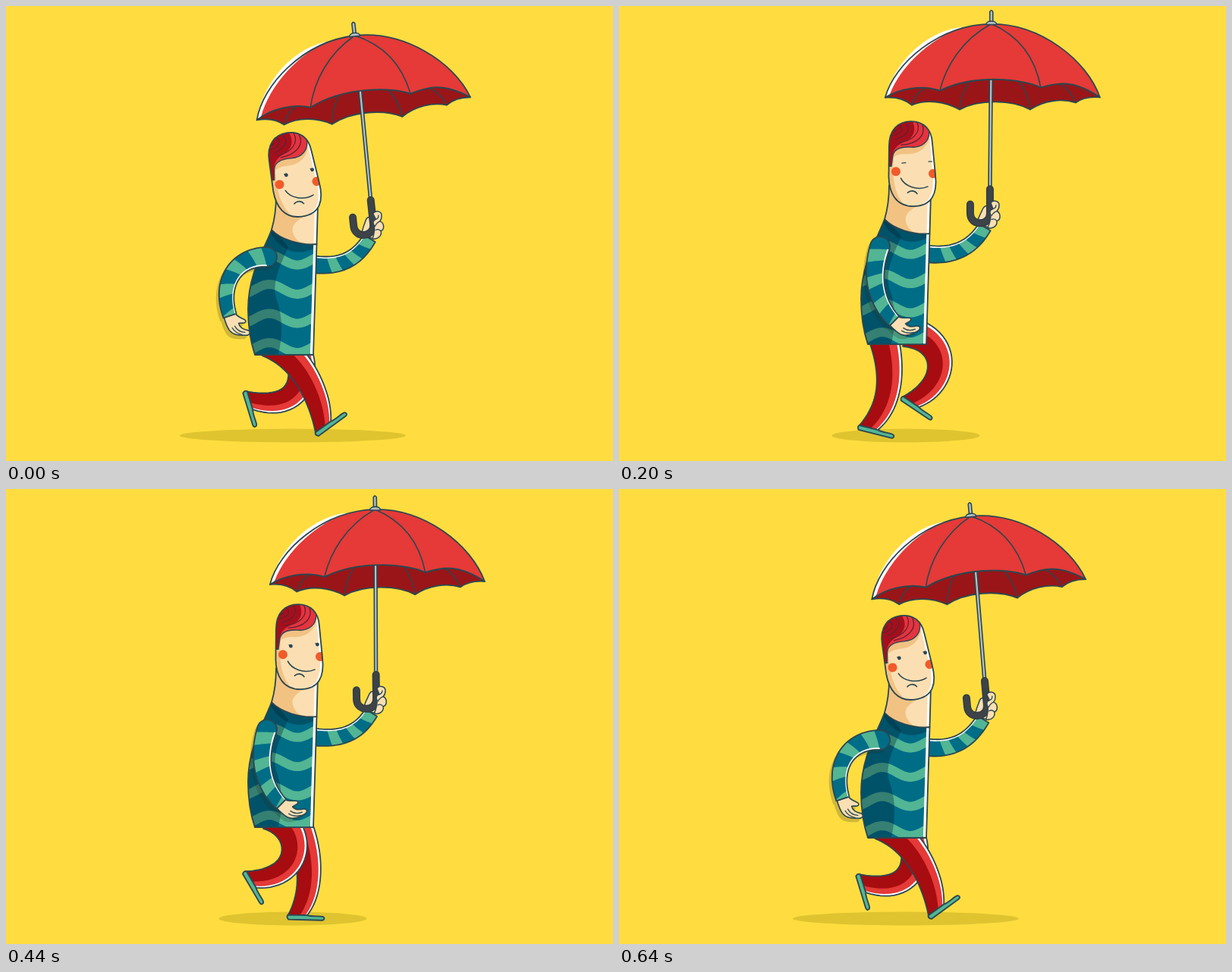
An HTML page with a canvas that plays this animation: 800x600 px, repeating every 0.68 s.

```html
<!DOCTYPE html>
<html lang="en">
<head>
<meta charset="utf-8">
<title>Umbrella walk</title>
<style>
html, body { margin: 0; width: 100%; height: 100%; overflow: hidden; background: #ffdd40; }
canvas { display: block; width: 800px; height: 600px; }
</style>
</head>
<body>
<canvas id="stage"></canvas>
<script>
const canvas = document.getElementById('stage');
const ctx = canvas.getContext('2d');
const dpr = window.devicePixelRatio || 1;
canvas.width = 800 * dpr;
canvas.height = 600 * dpr;

const STEP = 40, STEPS = 17, CYCLE = 16;
const INK = '#2b4650', TEAL = '#006d87', GREEN = '#52b594', RED = '#e53a37',
  DARK_RED = '#a60c10', SKIN = '#fbdfb3', TAN = '#f2c283', SHADE = 'rgba(0,35,55,.36)',
  GREY = '#b4c0c6';

// Step path: time, ankle x, y, foot angle
const stride = [
  [0, 418, 555, -36], [2, 368, 562, -5], [5, 329, 556, 14], [7, 291, 531, 60],
  [9, 299, 514, 76], [13, 354, 522, 34], [15, 401, 541, -5]
];
// Umbrella bob: time, grip x, y, tilt
const bob = [
  [.5, 480.5, 254, -6.1], [1, 482, 254, -4], [2, 485.5, 247, -2.1],
  [4.5, 489.2, 239.4, .2], [7, 485, 245, -2.9]
];

const rad = d => d * Math.PI / 180;
const wave = (p, peak = 0) => Math.cos((p - peak) / CYCLE * 2 * Math.PI);

// Smooth cyclic interpolation through the keys
function pose(keys, time, cycle) {
  const n = keys.length;
  const key = i => {
    const turn = Math.floor(i / n), [t, ...v] = keys[i - turn * n];
    return { t: t + turn * cycle, v };
  };
  const p = time % cycle;
  let i = n - 1;
  while (i >= 0 && keys[i][0] > p) i--;
  const [a, b, c, d] = [key(i - 1), key(i), key(i + 1), key(i + 2)];
  const h = c.t - b.t, s = (p - b.t) / h, s2 = s * s, s3 = s2 * s;
  return b.v.map((v, k) => {
    const m0 = (c.v[k] - a.v[k]) / (c.t - a.t) * h;
    const m1 = (d.v[k] - v) / (d.t - b.t) * h;
    return (2 * s3 - 3 * s2 + 1) * v + (s3 - 2 * s2 + s) * m0
      + (3 * s2 - 2 * s3) * c.v[k] + (s3 - s2) * m1;
  });
}

function paint(path, fill, line, width = 1.8) {
  const p = typeof path === 'string' ? new Path2D(path) : path;
  if (fill) { ctx.fillStyle = fill; ctx.fill(p); }
  if (line) { ctx.strokeStyle = line; ctx.lineWidth = width; ctx.stroke(p); }
}

function dot(x, y, rx, fill, ry = rx) {
  const p = new Path2D();
  p.ellipse(x, y, rx, ry, 0, 0, 7);
  paint(p, fill);
}

function group(draw) {
  ctx.save();
  draw();
  ctx.restore();
}

// Tapered tube along a cubic curve; u runs from -1 to 1 across it.
// An end angle turns the far cut into that direction.
class Tube {
  constructor(pts, w0, w1, end) { Object.assign(this, { pts, w0, w1, end }); }
  at(t, u) {
    const [x0, y0, x1, y1, x2, y2, x3, y3] = this.pts, m = 1 - t;
    const mix = (a, b, c, d) => m * m * m * a + 3 * m * m * t * b + 3 * m * t * t * c + t * t * t * d;
    const slope = (a, b, c, d) => m * m * (b - a) + 2 * m * t * (c - b) + t * t * (d - c);
    const dx = slope(x0, x1, x2, x3), dy = slope(y0, y1, y2, y3), len = Math.hypot(dx, dy);
    let nx = dy / len, ny = -dx / len;
    if (this.end !== undefined) {
      const k = Math.max(0, (t - .7) / .3);
      nx += (Math.cos(this.end) - nx) * k;
      ny += (Math.sin(this.end) - ny) * k;
    }
    const r = u * (this.w0 + (this.w1 - this.w0) * t) / 2;
    return [mix(x0, x1, x2, x3) + nx * r, mix(y0, y1, y2, y3) + ny * r];
  }
  strip(u0, u1, cap) {
    const p = new Path2D(), n = 28;
    for (let i = 0; i <= n; i++) p.lineTo(...this.at(i / n, u1));
    for (let i = n; i >= 0; i--) p.lineTo(...this.at(i / n, u0));
    if (cap) {
      const [x, y] = this.pts, [ex, ey] = this.at(0, 1);
      const a = Math.atan2(ey - y, ex - x);
      p.arc(x, y, this.w0 / 2, a + Math.PI, a + 2 * Math.PI);
    }
    p.closePath();
    return p;
  }
  ring(t0, t1) {
    const p = new Path2D(), n = 8;
    const edge = (t, u) => this.at(Math.min(1, Math.max(0, t - .03 * u)), u);
    for (let i = -n; i <= n; i++) p.lineTo(...edge(t0, i / n));
    for (let i = n; i >= -n; i--) p.lineTo(...edge(t1, i / n));
    p.closePath();
    return p;
  }
}

function leg(p, hem, shift) {
  const [ax, y, angle] = pose(stride, p, CYCLE), x = ax + shift;
  const hx = 346 + shift, hy = hem - 17;
  const swing = wave(p, 13.3), thigh = rad(50 + 32 * swing), reach = 49 + 9 * swing;
  const shin = rad(angle + 31), bend = 47 + .36 * angle;
  const t = new Tube([
    hx, hy, hx + reach * Math.sin(thigh), hy + reach * Math.cos(thigh),
    x + bend * Math.sin(shin), y - bend * Math.cos(shin), x, y
  ], 40, 25, rad(angle));
  paint(t.strip(-1, 1), DARK_RED);
  paint(t.strip(.25, .8), RED);
  paint(t.strip(.8, 1), '#fff');
  paint(t.strip(-1, 1), null, INK);
  group(() => {
    ctx.translate(x, y);
    ctx.rotate(rad(angle));
    paint('M-13 0L12 0C20 2 28 0 33 1C36 2 36 6 32 6L-12 6Q-15 3-13 0Z', GREEN, INK);
  });
}

function sleeve(t, first, cap) {
  const shape = t.strip(-1, 1, cap);
  paint(shape, TEAL);
  for (let s = first; s < 1; s += .31) paint(t.ring(s, s + .14), GREEN);
  paint(t.strip(.78, 1), '#fff');
  paint(shape, null, INK);
}

function hand(x, y, angle, fill, line) {
  ctx.translate(x, y);
  ctx.rotate(angle);
  paint('M0-8C4-9 8-14 11-17C14-19 16-16 14-12L13-8C19-7 23-12 26-17C29-20 33-17 31-12'
    + 'C28-2 25 4 18 6.5C11 8.5 4 8 0 8Z', fill, line, 1.6);
  if (line) paint('M15-2C21-3 25-7 27-12M16 2C22 1 26-3 29-8', null, line, 1.3);
}

function frontArm(p, b) {
  const c = wave(p);
  const [x2, y2, x, y] = [322 - 42 * c, 383 - 20 * c, 344 - 49 * c, 413.5 - 5 * c];
  const t = new Tube([344, 331 - b, 324 - 19 * c, 348 - 18 * c, x2, y2, x, y], 26, 18);
  const angle = Math.atan2(y - y2, x - x2), shadow = 'rgba(40,45,30,.22)';
  group(() => {
    ctx.translate(-4, 5);
    paint(t.strip(-1, 1, true), shadow);
    hand(x, y, angle, shadow);
  });
  group(() => hand(x, y, angle, SKIN, INK));
  sleeve(t, .03, true);
}

const torsoShape = new Path2D('M350 295C342 318 319 352 319 400C319 425 324 448 328 460'
  + 'L405 460L409.5 314C388 316 362 308 350 295Z');

function torso() {
  paint('M356 250C356 270 353 285 350 295C362 308 388 316 409 314L411 255Z', TAN);
  paint('M411 255C404 280 374 280 378 298C380 306 386 312 392 314L409 314Z', SKIN);
  paint('M408.5 262L407 314', null, '#fff', 3);
  paint('M356 250C356 270 353 285 350 295M411 262L409.5 314', null, INK);
  paint(torsoShape, TEAL);
  group(() => {
    ctx.clip(torsoShape);
    for (let k = 0; k < 5; k++) {
      const stripe = new Path2D();
      for (let x = 314; x <= 414; x += 3) {
        stripe.lineTo(x, 296.5 + 38.5 * k - 6.5 * Math.cos((x - 347) / 74 * 2 * Math.PI));
      }
      paint(stripe, null, GREEN, 12);
    }
    paint('M310 290L350 290L372 318C362 340 350 365 356 385C364 405 366 435 358 462L310 462Z', SHADE);
    paint('M345 290L412 305L410 316C400 326 378 328 366 318C356 312 350 304 345 290Z', SHADE);
    paint('M402.8 462L407.3 312', null, '#fff', 4);
  });
  paint(torsoShape, null, INK);
}

const headShape = new Path2D('M356 185C356 163 368 152 385 152C402 152 412 163 413 180'
  + 'L417 222C420 248 412 264 388 264C364 264 356 245 355.5 225Z');

function head(b, blink) {
  const drop = 14 - b;
  ctx.translate(386, 250 + drop);
  ctx.rotate(rad(-drop * .6));
  ctx.translate(-386, -250);
  paint(headShape, SKIN);
  group(() => {
    ctx.clip(headShape);
    paint('M354 180L364 185C358 225 362 250 380 266L354 266Z', TAN);
    paint('M358 204C364 194 372 195 384 195C396 194 404 188 409 176L404 165L360 185Z', TAN);
    paint('M411 165L415.5 222C418 246 411 258 402 262', null, '#fff', 4);
    dot(365, 218, 6, '#f15a2b');
    dot(414, 221, 6, '#f15a2b');
    const hair = 'M353 211L354 150L398 150C405 154 409 160 409 166C409 178 400 187 385 186'
      + 'C372 185 363 188 361 197L359 211Z';
    paint(hair, '#e5343f');
    paint('M353 211L354 150L386 150C393 162 389 174 376 179C364 184 361 192 361 197L359 211Z', '#a50f1c');
    paint('M400 156C405 170 394 182 372 183M393 153C399 167 387 178 368 180'
      + 'M379 155C386 163 378 172 364 176M370 157C377 163 370 169 360 171M366 163Q364 166 360 166',
      null, '#5e2230', 1.3);
    paint(hair, null, INK, 1.4);
  });
  paint(headShape, null, INK);
  if (blink) {
    paint('M373 207L378 206.5M408 205L412.5 205', null, INK, 1.3);
  } else {
    dot(375.5, 207, 2.4, INK);
    dot(410.5, 205, 2.4, INK);
    paint('M373 205.5L375 206.5M408 203.5L410 204.5', null, INK, 1.2);
  }
  paint('M371.5 227C376 237 393 244 407 238M380.5 246C384 242.5 390 243 393 247.5', null, INK, 1.6);
}

function umbrella() {
  const rim = 'C600 98 580 101 556 108C535 97 470 89 423 112C400 104 370 109 351 121';
  const dome = 'M351 121C363 76 422 25 491 24C556 24 617 72 634 121';
  const under = 'M351 121C365 120 377 123 386 131C405 123 430 126 449 137C475 123 518 124 542 137'
    + 'C560 125 584 122 602 128C613 120 624 120 634 121' + rim + 'Z';
  paint(under, '#9a1518', INK);
  paint('M386 131Q391 116 403 109M449 137Q451 117 462 100M542 137Q540 116 528 101M602 128Q596 113 583 104',
    null, INK, 1.5);
  paint('M490.5 97L489 242', null, INK, 5.4);
  paint('M490.5 97L489 242', null, GREY, 2.2);
  paint(dome + rim + 'Z', RED);
  paint('M351 121C363 76 405 32 455 28C416 40 373 76 357 117Z', '#fff');
  paint(dome + rim + 'Z', null, INK);
  paint('M491 24C452 45 431 80 423 112M491 24C532 42 550 75 556 108', null, INK, 1.6);
  paint('M489 21L489 8Q491 4.5 493 8L493 21Z', GREY, INK, 1.6);
  paint('M484 25C484 19 498 19 498 25Z', GREY, INK, 1.6);

  // Hand around the grip
  paint('M473 289C472 281 476 276 480 267C483 262 488 264 487 270L496 280L490 293Z', SKIN, INK, 1.5);
  paint('M489 242L489 274C489 291 463 291 463 274L463 262', null, '#2f3c43', 10);
  paint('M489 242L489 274C489 291 463 291 463 274L463 262', null, '#3d4347', 7.5);
  paint('M490 260C494 255 502 258 501 264C501 267 500 269 498 271C503 273 504 282 498 284'
    + 'C499 290 493 295 486 293C489 286 490 282 490 276C488 272 489 269 493 268Z', SKIN, INK, 1.5);
  paint('M493 268Q497 267 497 263M498 271Q494 272 491 277M498 284Q495 280 491 282', null, INK, 1.3);
}

function draw(i) {
  const p = i % CYCLE, rise = Math.abs(Math.sin(p / 8 * Math.PI));
  const b = 15 * rise, hem = 460 - b;
  // The bob lingers half a beat at its lowest point as the loop restarts
  const [gx, gy, tilt] = pose(bob, i || .5, 8);
  ctx.setTransform(dpr, 0, 0, dpr, 0, 0);
  ctx.lineJoin = ctx.lineCap = 'round';
  ctx.fillStyle = '#ffdd40';
  ctx.fillRect(0, 0, 800, 600);
  dot(378, 566.5, 149 - 55 * rise ** .85, '#dfc430', 9);

  // Wrist follows the grip
  const c = Math.cos(rad(tilt)), s = Math.sin(rad(tilt));
  const wx = gx - 7 * c - 52 * s, wy = gy - 7 * s + 52 * c;
  sleeve(new Tube([400, 340 - b, 440, 346 - b, wx - 17, wy + 28, wx, wy], 23, 18), .24);
  group(() => {
    ctx.translate(gx, gy);
    ctx.rotate(rad(tilt));
    ctx.translate(-489, -240);
    umbrella();
  });

  leg((p + CYCLE / 2) % CYCLE, hem, 31);
  leg(p, hem, 0);
  group(() => { ctx.translate(0, -b); torso(); });
  group(() => head(b, i >= 5 && i <= 7));
  frontArm(p, b);
}

function tick() {
  draw(Math.floor(performance.now() / STEP) % STEPS);
  requestAnimationFrame(tick);
}
tick();
</script>
</body>
</html>
```
